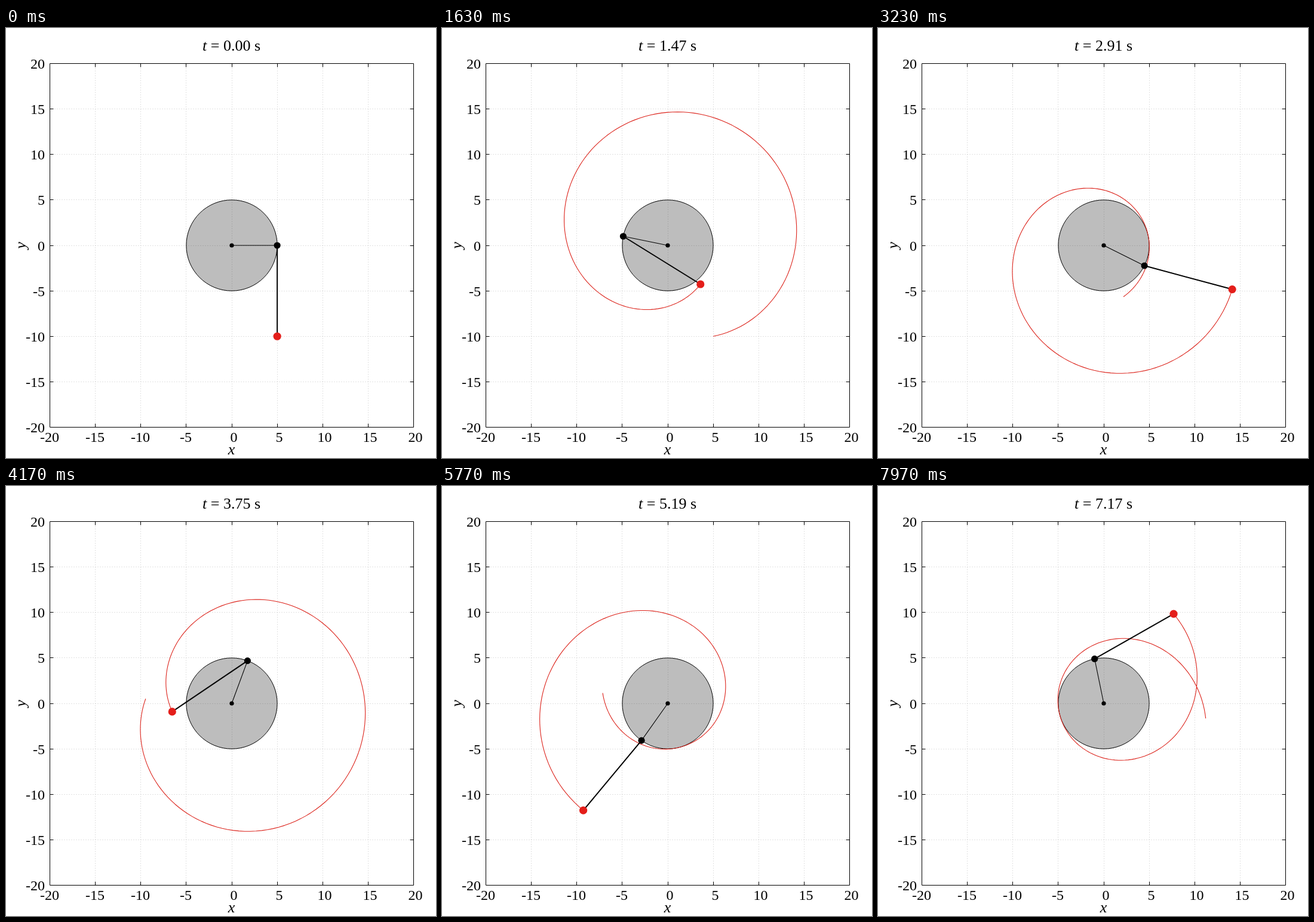
These frames come from a looping animation (720 by 720 pixels, 8 s). An HTML page:

```html
<!DOCTYPE html>
<html lang="en">
<head>
<meta charset="utf-8">
<title>Pendulum on a rotating disc</title>
<style>
  html, body { margin: 0; width: 100%; height: 100%; overflow: hidden; background: #fff; }
  svg { display: block; width: 100vw; height: 100vh; }
  text { font-family: "Liberation Serif", "Times New Roman", serif; font-size: 24px; }
  .label { font-size: 26px; text-anchor: middle; }
  .var { font-style: italic; }
  .line { fill: none; stroke: #000; }
  #grid { fill: none; stroke: #c4c4c4; stroke-dasharray: 1 3; }
  #trail { fill: none; stroke: #dc241c; stroke-width: 1.1; stroke-linejoin: round; }
</style>
</head>
<body>
<svg viewBox="0 0 720 720">
  <path id="grid"/>
  <path id="axes" class="line"/>
  <g id="ticks"></g>
  <text class="label" x="377.5" y="38" xml:space="preserve"><tspan class="var">t</tspan> = <tspan id="clock">0.00</tspan> s</text>
  <text class="label var" x="377.5" y="714">x</text>
  <text class="label var" transform="translate(33 364) rotate(-90)">y</text>
  <circle id="disc" stroke="#000" fill="#000" fill-opacity=".26"/>
  <path id="trail"/>
  <path id="spoke" class="line" stroke-width="1.1"/>
  <path id="rod" class="line" stroke-width="2"/>
  <circle id="hub" r="3.6"/>
  <circle id="pivot" r="5.6"/>
  <circle id="bob" r="6.6" fill="#e41e1a"/>
</svg>
<script>
const LOOP = 8000, FRAMES = 240;
const FRAME_STEP = 0.03, SUBSTEPS = 15, TRAIL_FRAMES = 50, TRAIL_STRIDE = 5;
const RADIUS = 5, ROD = 10, OMEGA = 2, GRAVITY = 9.81;
const LEFT = 73.5, TOP = 59.5, SIZE = 609, RANGE = 20;
const SCALE = SIZE / (2 * RANGE);

const byId = id => document.getElementById(id);
const px = x => LEFT + (x + RANGE) * SCALE;
const py = y => TOP + (RANGE - y) * SCALE;
const point = p => `${px(p.x).toFixed(2)} ${py(p.y).toFixed(2)}`;
const place = (id, p) => {
  byId(id).setAttribute('cx', px(p.x));
  byId(id).setAttribute('cy', py(p.y));
};
const draw = (id, points) => byId(id).setAttribute('d', 'M' + points.map(point).join('L'));

function addLabel(value, x, y, anchor) {
  const label = document.createElementNS('http://www.w3.org/2000/svg', 'text');
  label.setAttribute('x', x);
  label.setAttribute('y', y);
  label.setAttribute('text-anchor', anchor);
  label.textContent = value;
  byId('ticks').append(label);
}

function drawAxes() {
  const right = LEFT + SIZE, bottom = TOP + SIZE, tick = 6;
  let grid = '';
  let axes = `M${LEFT} ${TOP}H${right}V${bottom}H${LEFT}Z`;
  for (let v = -RANGE; v <= RANGE; v += 5) {
    const x = Math.floor(px(v)) + 0.5, y = Math.floor(py(v)) + 0.5;
    if (Math.abs(v) < RANGE) {
      grid += `M${x} ${bottom}V${TOP}M${LEFT} ${y}H${right}`;
      axes += `M${x} ${TOP}v${tick}M${x} ${bottom}v${-tick}`;
      axes += `M${LEFT} ${y}h${tick}M${right} ${y}h${-tick}`;
    }
    addLabel(v, x + (v < 0 ? -0.5 : 3), 693, 'middle');
    addLabel(v, 65, y + 8.5, 'end');
  }
  byId('grid').setAttribute('d', grid);
  byId('axes').setAttribute('d', axes);
}

const pivotAt = t => ({ x: RADIUS * Math.cos(OMEGA * t), y: RADIUS * Math.sin(OMEGA * t) });

// Euler integration of the rod angle, measured from straight down.
function simulate() {
  const dt = FRAME_STEP / SUBSTEPS, path = [];
  let angle = 0, speed = 5;
  for (let i = 0; i <= FRAMES * SUBSTEPS; i++) {
    const t = i * dt, p = pivotAt(t);
    path.push({ x: p.x + ROD * Math.sin(angle), y: p.y - ROD * Math.cos(angle) });
    const accel = OMEGA ** 2 * RADIUS / ROD * Math.cos(angle - OMEGA * t)
                - GRAVITY / ROD * Math.sin(angle);
    angle += speed * dt;
    speed += accel * dt;
  }
  return path;
}

const center = { x: 0, y: 0 };
const path = simulate();
let shown = -1;

function render(frame) {
  const t = frame * FRAME_STEP, pivot = pivotAt(t);
  const end = frame * SUBSTEPS, bob = path[end];
  const trail = [];
  for (let i = Math.max(0, frame - TRAIL_FRAMES) * SUBSTEPS; i <= end; i += TRAIL_STRIDE) {
    trail.push(path[i]);
  }
  draw('trail', trail);
  draw('spoke', [center, pivot]);
  draw('rod', [pivot, bob]);
  place('pivot', pivot);
  place('bob', bob);
  byId('clock').textContent = t.toFixed(2);
}

function tick() {
  // Thirty frames a second, each start rounded to a hundredth of a second.
  const hundredths = Math.floor(performance.now() % LOOP / 10);
  const frame = Math.min(FRAMES - 1, Math.floor(hundredths * 0.3 + 0.15));
  if (frame !== shown) render(shown = frame);
  requestAnimationFrame(tick);
}

drawAxes();
place('disc', center);
place('hub', center);
byId('disc').setAttribute('r', RADIUS * SCALE);
tick();
</script>
</body>
</html>
```
